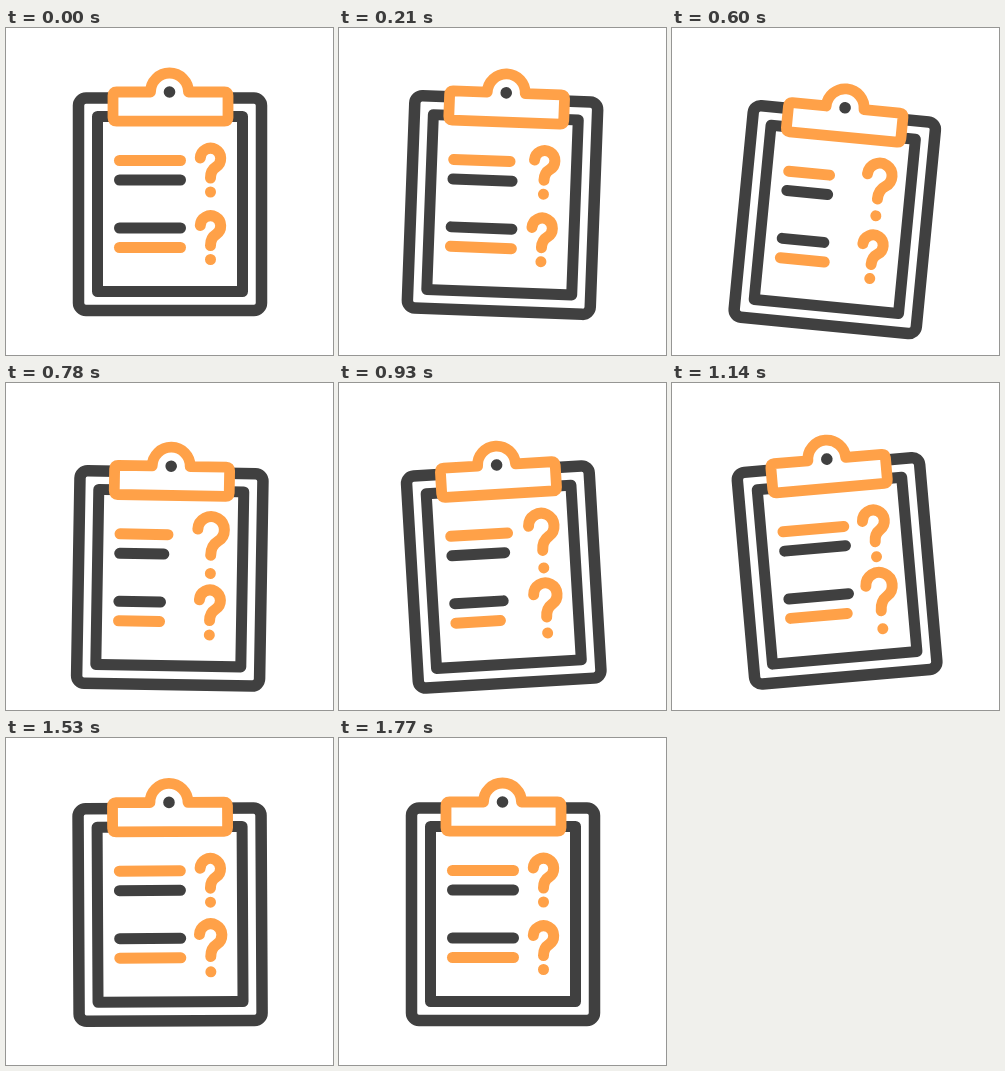
An HTML page that plays this animation: 327 by 327 pixels, repeating every 1.83 s.

```html
<!DOCTYPE html>
<html lang="en">
<head>
<meta charset="utf-8">
<title>Clipboard checklist</title>
<style>
  html, body { margin: 0; width: 100%; height: 100%; overflow: hidden; background: #fff; }
  svg { display: block; width: 100%; height: 100%; }
  g { fill: none; stroke-linecap: round; stroke-linejoin: round; }
  .dark { stroke: #404040; }
  .warm { stroke: #ffa148; }
</style>
</head>
<body>
<svg viewBox="0 0 327 327">
  <g id="board" stroke-width="11">
    <rect class="dark" x="72.5" y="70" width="183" height="212.5" rx="7.5" stroke-width="11.5"/>
    <rect class="dark" x="91.5" y="88.5" width="145" height="175"/>
    <path class="warm" fill="#fff" stroke-width="10.8"
      d="M110.5 64H144.5A19 19 0 0 1 182.5 64H218.5Q222 64 222 67.5V89.7Q222 93.2 218.5 93.2H110.5Q107 93.2 107 89.7V67.5Q107 64 110.5 64Z"/>
    <circle cx="163.5" cy="64" r="5.8" fill="#404040"/>
    <path class="line warm"/>
    <path class="line dark"/>
    <path class="line dark"/>
    <path class="line warm"/>
    <path class="mark warm" d="M-10.2-12A10.2 10.2 0 1 1 5.5-3Q0 .5 0 8M0 22v0"/>
    <path class="mark warm" d="M-10.2-12A10.2 10.2 0 1 1 5.5-3Q0 .5 0 8M0 22v0"/>
  </g>
</svg>
<script>
const LOOP = 1830, STEP = 30;
const board = document.getElementById('board');
const lines = document.querySelectorAll('.line');
const marks = document.querySelectorAll('.mark');
const lineY = [132.5, 152, 200, 219.5];
const markY = [142, 209.5];
const markTimes = [[290, 780, 800, 1300], [680, 1190, 1190, 1740]];

// Smooth 0 to 1 between times a and b
function ease(t, a, b) {
  const p = Math.min(1, Math.max(0, (t - a) / (b - a)));
  return p * p * (3 - 2 * p);
}

// Rise from a to b, fall from c to d
const bump = (t, a, b, c, d) => ease(t, a, b) - ease(t, c, d);

function draw(t) {
  const drop = 19.2 * bump(t, 130, 790, 800, 1600);
  const angle = 6 * ease(t, 40, 460) - 11 * ease(t, 535, 1055) + 5 * ease(t, 1168, 1594);
  board.setAttribute('transform', `translate(0 ${drop}) rotate(${angle} 163.5 163.5)`);

  lines.forEach((line, i) => {
    const start = 60 + 60 * i, back = 590 + 70 * i;
    const length = 61 - 20 * bump(t, start, start + 480, back, back + 480);
    line.setAttribute('d', `M113.5 ${lineY[i]}h${length}`);
  });

  marks.forEach((mark, i) => {
    const scale = 1 + 0.3 * bump(t, ...markTimes[i]);
    mark.setAttribute('transform', `translate(204.5 ${markY[i]}) scale(${scale})`);
    mark.setAttribute('stroke-width', 11 / scale);
  });
}

function tick() {
  const t = performance.now() % LOOP;
  draw(t < 60 ? 0 : Math.min(1770, Math.floor(t / STEP) * STEP));
  requestAnimationFrame(tick);
}
tick();
</script>
</body>
</html>
```
